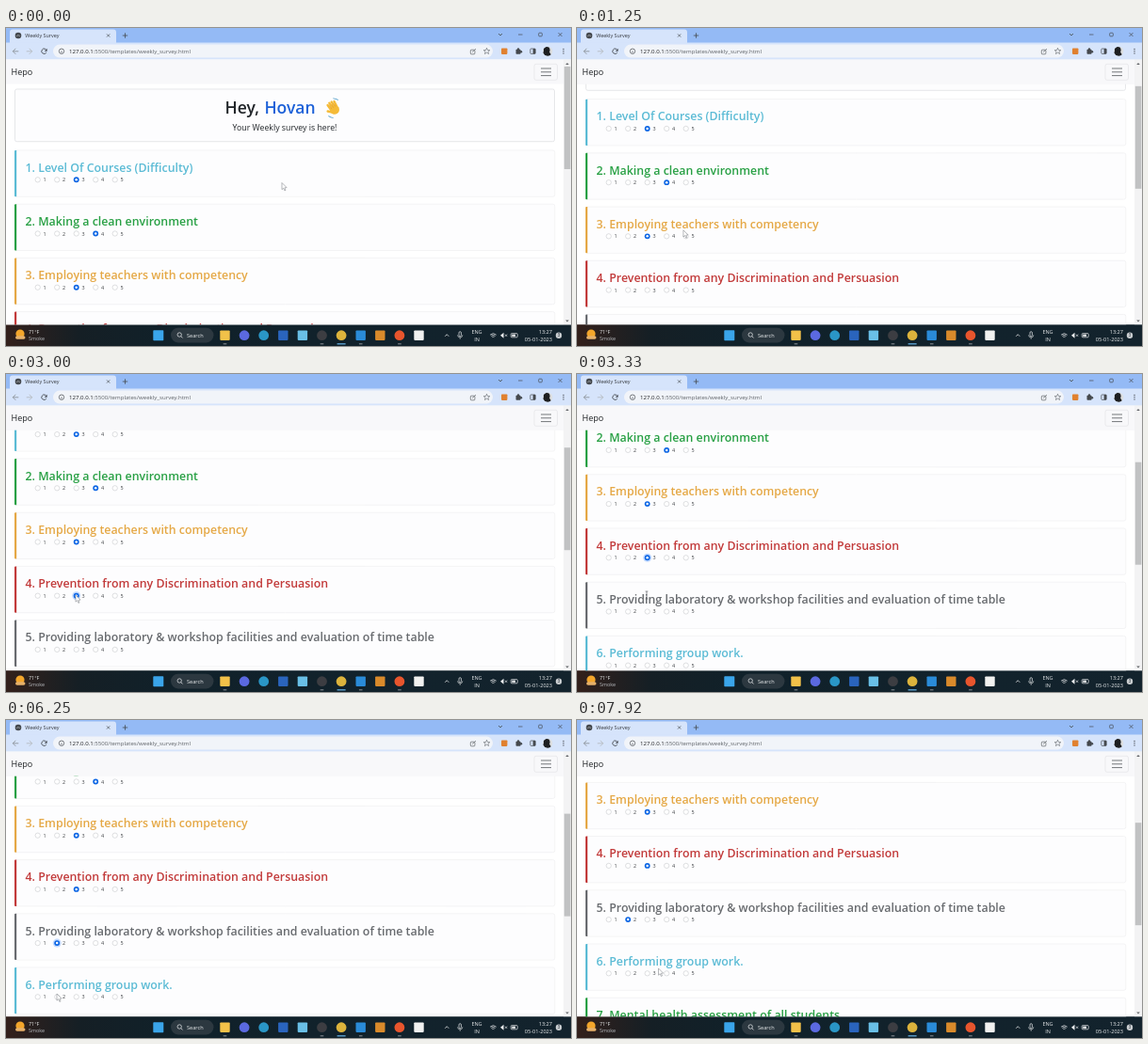
An HTML page with a canvas that plays this animation: 600 by 338 pixels, repeating every 8 s.

```html
<!DOCTYPE html>
<html lang="en">
<head>
<meta charset="utf-8">
<title>Weekly Survey</title>
<style>
html, body { margin: 0; width: 100%; height: 100%; overflow: hidden; background: #fff; }
canvas { display: block; width: 600px; height: 338px; }
</style>
</head>
<body>
<canvas id="stage"></canvas>
<script>
const W = 600, H = 338, LOOP = 8000, STEP = 250 / 3;
const NAV_TOP = 33.5, NAV_BOTTOM = 59.5, BAR_TOP = 315.5;
const CARD_TOP = 130, PITCH = 57.2, CARD_H = 49.3;
const TITLE_SIZE = 12.38, TITLE_BASE = 22.7, RADIO_DROP = 31.3;
const FONT = '"Open Sans", "Noto Sans", sans-serif';
const INK = '#212529', BLUE = '#0d66e4', ICON = '#45494e', LIGHT = '#eceeef';
const FRAME = '#94baf5', TOOLBAR = '#d6e4fb';

const canvas = document.getElementById('stage');
const g = canvas.getContext('2d');
const dpr = window.devicePixelRatio || 1;
canvas.width = W * dpr;
canvas.height = H * dpr;

const PALETTE = ['#5bbbd5', '#28a044', '#e5a845', '#c23a3a', '#686b6f'];
const TITLES = [
  'Level Of Courses (Difficulty)',
  'Making a clean environment',
  'Employing teachers with competency',
  'Prevention from any Discrimination and Persuasion',
  'Providing laboratory & workshop facilities and evaluation of time table',
  'Performing group work.',
  'Mental health assessment of all students'
].map((s, i) => `${i + 1}. ${s}`);

// one per card; those with times are chosen during the loop
const ANSWERS = [
  { pick: 3 }, { pick: 4 }, { pick: 3 },
  { pick: 3, press: 2750, check: 3000, blur: 4250 },
  { pick: 2, press: 5083, check: 5167, blur: 6750 }
];

const SCROLLS = [
  { at: 1000, span: 667, by: 97.2, power: 1.74 },
  { at: 3083, span: 834, by: 55.8, power: 3.6 },
  { at: 7250, span: 333, by: 25, power: 3 }
];

const MOVES = [
  { at: 333, end: 750, x: 124.5, y: 205 },
  { at: 1000, end: 1667, x: 88, y: 236 },
  { at: 1917, end: 2500, x: 74, y: 235, bend: -7 },
  { at: 3333, end: 4000, x: 52, y: 238 },
  { at: 4667, end: 4833, x: 53, y: 237 },
  { at: 5250, end: 6083, x: 54, y: 291, bend: 16 },
  { at: 7667, end: 7917, x: 86.5, y: 264 }
];

const progress = (t, a, b) => Math.min(1, Math.max(0, (t - a) / (b - a)));
const smooth = p => p * p * (3 - 2 * p);

function scrollAt(t) {
  return SCROLLS.reduce((sum, s) =>
    sum + s.by * (1 - Math.pow(1 - progress(t, s.at, s.at + s.span), s.power)), 0);
}

function pointerAt(t) {
  let x = 293, y = 164.5;
  for (const m of MOVES) {
    const p = progress(t, m.at, m.end), e = smooth(p);
    x += (m.x - x) * e;
    y += (m.y - y) * e + (m.bend || 0) * Math.sin(Math.PI * p);
  }
  return [x, y];
}

function text(s, x, y, size, color = INK, weight = 400, align = 'left') {
  g.font = `${weight} ${size}px ${FONT}`;
  g.textAlign = align;
  g.fillStyle = color;
  g.fillText(s, x, y);
}

function paint(fill, stroke, lw = 0.7) {
  if (fill) { g.fillStyle = fill; g.fill(); }
  if (stroke) { g.strokeStyle = stroke; g.lineWidth = lw; g.stroke(); }
}

function box(x, y, w, h, r, fill, stroke, lw) {
  g.beginPath();
  g.roundRect(x, y, w, h, r);
  paint(fill, stroke, lw);
}

function rect(x, y, w, h, color) {
  box(x, y, w, h, 0, color);
}

function square(x, y, size, fill, stroke) {
  box(x - size / 2, y - size / 2, size, size, 0.8, fill, stroke);
}

function disc(x, y, r, fill, stroke, lw) {
  arc(x, y, r, 0, Math.PI * 2, stroke, lw, fill);
}

function arc(x, y, r, a, b, stroke, lw, fill) {
  g.beginPath();
  g.arc(x, y, r, a, b);
  paint(fill, stroke, lw);
}

// points are x, y pairs
function trace(p) {
  g.beginPath();
  for (let i = 0; i < p.length; i += 2) g.lineTo(p[i], p[i + 1]);
}

function line(color, lw, ...p) {
  trace(p);
  paint(null, color, lw);
}

function poly(fill, stroke, ...p) {
  trace(p);
  g.closePath();
  paint(fill, stroke, 0.6);
}

function cross(x, y, r, color) {
  line(color, 0.7, x - r, y - r, x + r, y + r);
  line(color, 0.7, x - r, y + r, x + r, y - r);
}

// dir 1 points down, -1 up
function chevron(x, y, dir, color) {
  line(color, 0.8, x - 2, y - dir, x, y + dir, x + 2, y - dir);
}

function arrow(x, dir, color) {
  const y = 24.8, r = 3;
  line(color, 0.8, x - r * dir, y, x + r * dir, y);
  line(color, 0.8, x, y - r, x + r * dir, y, x, y + r);
}

function star(x, y, r) {
  const p = [];
  for (let i = 0; i < 10; i++) {
    const d = i % 2 ? r * 0.43 : r, a = (i / 5 - 0.5) * Math.PI;
    p.push(x + d * Math.cos(a), y + d * Math.sin(a));
  }
  poly(null, '#5f6368', ...p);
}

function drawTabs() {
  rect(0, 0, W, 16, FRAME);
  box(4, 1.5, 113, 16, [3, 3, 0, 0], TOOLBAR);
  disc(13, 8, 3.3, ICON);
  arc(13, 10, 2.2, -2.6, -0.6, '#d5d8dc', 0.6);
  text('Weekly Survey', 20.3, 10, 5.4, '#33363a');
  cross(108.6, 8, 1.6, ICON);
  line(ICON, 0.8, 123.8, 8, 129.2, 8);
  line(ICON, 0.8, 126.5, 5.3, 126.5, 10.7);
  chevron(525, 7, 1, ICON);
  line(ICON, 0.7, 544, 7, 548.5, 7);
  square(567.5, 7, 3.6, null, ICON);
  cross(588.5, 7, 2, ICON);
}

function drawToolbar() {
  const y = 24.7;
  rect(0, 15.5, W, 18, TOOLBAR);
  arrow(10.3, -1, '#85898e');
  arrow(24.7, 1, '#b3b6ba');
  arc(40.5, y, 2.7, 0.5, 5.6, ICON, 0.9);
  poly(ICON, null, 43.6, y - 3, 43.6, y, 40.8, y);

  box(50, 17.6, 467, 14, 7, '#f1f4f9');
  disc(59, y, 2.7, null, ICON);
  line(ICON, 0.7, 59, y - 0.3, 59, y + 1.6);
  const host = '127.0.0.1';
  text(host, 67, 26.7, 6.09, '#202124');
  text(':5500/templates/weekly_survey.html', 67 + g.measureText(host).width, 26.7, 6.09, '#5f6368');

  square(495.6, y + 0.8, 4.6, null, '#5f6368');
  line('#5f6368', 0.7, 495, y + 1, 499, y - 2.6);
  star(510.5, y, 3.5);
  square(529.2, y, 6.4, '#e0812f');
  square(544, y + 0.6, 5, ICON);
  disc(544, y - 2.3, 1.2, ICON);
  disc(547, y + 0.6, 1.2, ICON);
  square(559.5, y, 5.4, null, ICON);
  rect(559.6, y - 2.7, 2.6, 5.4, ICON);

  g.save();
  disc(575.3, y, 5, '#dcdedf');
  g.clip();
  disc(574.2, y - 1.3, 3.4, '#1d1f22');
  disc(573.6, y + 4.5, 5, '#1d1f22');
  g.restore();
  for (let i = -1; i < 2; i++) disc(592, y + i * 2.2, 0.65, ICON);
}

function drawNav() {
  rect(0, NAV_TOP, 592, NAV_BOTTOM - NAV_TOP, '#f8f8fa');
  text('Hepo', 5.5, 50.2, 9, '#1f2225');
  box(561, 38.3, 24.5, 17, 2, null, '#dfe0e3', 0.6);
  for (let i = 0; i < 3; i++) line('#64676a', 0.9, 568, 43 + i * 3.8, 579, 43 + i * 3.8);
}

function drawScrollbar(scroll) {
  rect(592, NAV_TOP, 8, BAR_TOP - NAV_TOP, '#f3f3f4');
  for (const [y, d] of [[38, -1], [311.5, 1]]) {
    poly('#606266', null, 594.2, y - d, 596, y + d, 597.8, y - d);
  }
  rect(592.8, 41 + scroll * 0.383, 6.6, 109, '#c1c2c3');
}

function drawHand(x, y) {
  const skin = '#f5bb38', crease = '#d9952a';
  g.save();
  g.translate(x, y);
  g.rotate(-0.55);
  g.lineCap = 'round';
  for (let i = 0; i < 4; i++) {
    const fx = -3 + i * 2.4;
    line(skin, 2.4, fx, 1, fx * 1.1, -6.4 + Math.abs(i - 1.4));
  }
  line(skin, 2.5, -3, 4.2, -6.6, 0.6);
  disc(0.5, 3, 5, skin);
  for (let i = 0; i < 3; i++) {
    const fx = -1.8 + i * 2.4;
    line(crease, 0.5, fx, 0.3, fx, -3.5);
  }
  arc(0.5, 0, 9.4, -1, -0.45, '#4d9bc8', 0.9);
  arc(0, 2, 9.2, 2.2, 2.75, '#4d9bc8', 0.9);
  g.restore();
}

function drawHeader(top) {
  box(9.5, top, 573, 55.7, 2, '#fdfdfe', '#dcdde0');
  text('Hey,', 232.6, top + 26, 17.5, INK, 600);
  text('Hovan', 274.4, top + 26, 17.5, '#1d61d8', 600);
  drawHand(347, top + 19.5);
  text('Your Weekly survey is here!', 296, top + 43.6, 8.78, INK, 400, 'center');
}

function drawRadio(x, y, on, focus) {
  if (focus) disc(x, y, 4.5, 'rgba(13,110,253,0.25)');
  if (on) {
    disc(x, y, 2.95, BLUE);
    disc(x, y, 1.25, '#fff');
  } else {
    disc(x, y, 2.65, focus ? '#d8dde6' : '#fff', focus ? '#86b0ee' : '#c3c5c8', 0.55);
  }
}

function drawCard(i, top, t) {
  const color = PALETTE[i % PALETTE.length];
  const { pick = 0, press = 0, check = 0, blur = 0 } = ANSWERS[i] || {};
  box(9.5, top, 573.3, CARD_H, 2, '#fdfdfe', '#ececef', 0.6);
  box(9, top, 2.2, CARD_H, [1, 0, 0, 1], color);
  text(TITLES[i], 20.5, top + TITLE_BASE, TITLE_SIZE, color, 600);
  for (let n = 1; n <= 5; n++) {
    const x = 13.2 + n * 20.5, y = top + RADIO_DROP, mine = pick === n;
    drawRadio(x, y, mine && t >= check, mine && t >= press && t < blur);
    text(n, x + 7.4, y + 2, 5.4, '#3a3d41', 400, 'center');
  }
}

function drawPage(scroll, t) {
  g.save();
  g.beginPath();
  g.rect(0, NAV_BOTTOM, 592, BAR_TOP - NAV_BOTTOM);
  g.clip();
  rect(0, NAV_BOTTOM, 592, BAR_TOP - NAV_BOTTOM, '#fff');
  drawHeader(65 - scroll);
  TITLES.forEach((s, i) => drawCard(i, CARD_TOP + i * PITCH - scroll, t));
  g.restore();
}

function drawApps(y) {
  const colors = ['#f2c149', '#5b69e0', '#2a96c6', '#2a64bd', '#69bfe6', '#3c3d42',
    '#dcb33c', '#2a8bd8', '#d98a2b', '#e8552d', '#f1f1f0'];
  const shapes = 'soossoossos', open = '+----+-+-+-', active = 6;
  square(161.8, y, 11, '#3aa5ea');
  colors.forEach((color, i) => {
    const x = 232.5 + i * 20.6;
    if (shapes[i] === 's') square(x, y, 10.4, color);
    else disc(x, y, 5.4, color);
    if (open[i] === '+') rect(x - 1.8, 335.3, 3.6, 1, '#8d9299');
    if (i === active) rect(x - 4.5, 335.2, 9, 1.2, '#69b6ea');
  });
}

function drawTray(y) {
  chevron(468.2, y, -1, LIGHT);
  box(481, y - 4, 2.4, 5, 1.2, null, LIGHT);
  arc(482.2, y - 0.4, 2.6, 0, Math.PI, LIGHT, 0.6);
  line(LIGHT, 0.6, 482.2, y + 2.2, 482.2, y + 4);
  text('ENG', 500, 325, 5.5, LIGHT, 400, 'center');
  text('IN', 500, 332.6, 5.5, LIGHT, 400, 'center');
  for (let i = 0; i < 3; i++) arc(517.4, y + 3, 1.4 + i * 1.7, -2.3, -0.84, LIGHT, 0.8);
  poly(LIGHT, null, 525, y, 528.5, y - 3, 528.5, y + 3);
  cross(531, y, 1.1, LIGHT);
  box(536.2, y - 2.1, 7, 4.2, 0.9, null, LIGHT);
  rect(537.2, y - 1.1, 3.8, 2.2, LIGHT);
  text('13:27', 580, 325, 5.6, LIGHT, 400, 'right');
  text('05-01-2023', 580, 332.6, 5.6, LIGHT, 400, 'right');
  disc(587, y, 3.2, '#c9cdd0');
  text('3', 587, y + 1.6, 4.4, '#18202a', 400, 'center');
}

function drawTaskbar() {
  const mid = 326.7;
  const tint = g.createLinearGradient(0, 0, W, 0);
  tint.addColorStop(0, '#33201b');
  tint.addColorStop(0.13, '#151f25');
  tint.addColorStop(0.3, '#10212a');
  tint.addColorStop(1, '#13232d');
  rect(0, BAR_TOP, W, H - BAR_TOP, tint);

  disc(15, 325, 4.6, '#f3a52b');
  box(10, 327.2, 10.5, 3.6, 1.8, '#e6b06a');
  text('71°F', 24, 325, 5.4, LIGHT);
  text('Smoke', 24, 332.4, 5.4, '#b9bcc0');
  box(175, 318.8, 45.5, 15.6, 7.8, '#2c3840');
  disc(184.2, 326, 2.2, null, LIGHT);
  line(LIGHT, 0.8, 185.8, 327.6, 187.5, 329.4);
  text('Search', 192, 328.7, 5.6, LIGHT);
  drawApps(mid);
  drawTray(mid);
}

function overTitle(x, y, scroll) {
  g.font = `600 ${TITLE_SIZE}px ${FONT}`;
  return TITLES.some((title, i) => {
    const dy = y - (CARD_TOP + i * PITCH - scroll);
    return dy > 10 && dy < 24 && x > 20 && x < 20.5 + g.measureText(title).width;
  });
}

function drawPointer(x, y, beam) {
  if (beam) {
    line('#55585c', 0.7, x, y - 4, x, y + 4);
    for (const d of [-4, 4]) line('#55585c', 0.6, x - 1.4, y + d, x + 1.4, y + d);
    return;
  }
  poly('#fff', '#85888d',
    x, y, x, y + 7.2, x + 1.7, y + 5.7, x + 2.9, y + 8.4,
    x + 4, y + 7.9, x + 2.9, y + 5.3, x + 5.1, y + 5.1);
}

function draw(now) {
  const t = Math.floor((now % LOOP + 4) / STEP) * STEP % LOOP + 0.5;
  const scroll = scrollAt(t);
  const [x, y] = pointerAt(t);
  g.setTransform(dpr, 0, 0, dpr, 0, 0);
  drawPage(scroll, t);
  drawTabs();
  drawToolbar();
  drawNav();
  drawScrollbar(scroll);
  drawTaskbar();
  drawPointer(x, y, overTitle(x, y, scroll));
}

let start;
function tick(now) {
  if (start === undefined) start = now;
  draw(now - start);
  requestAnimationFrame(tick);
}
requestAnimationFrame(tick);
</script>
</body>
</html>
```
